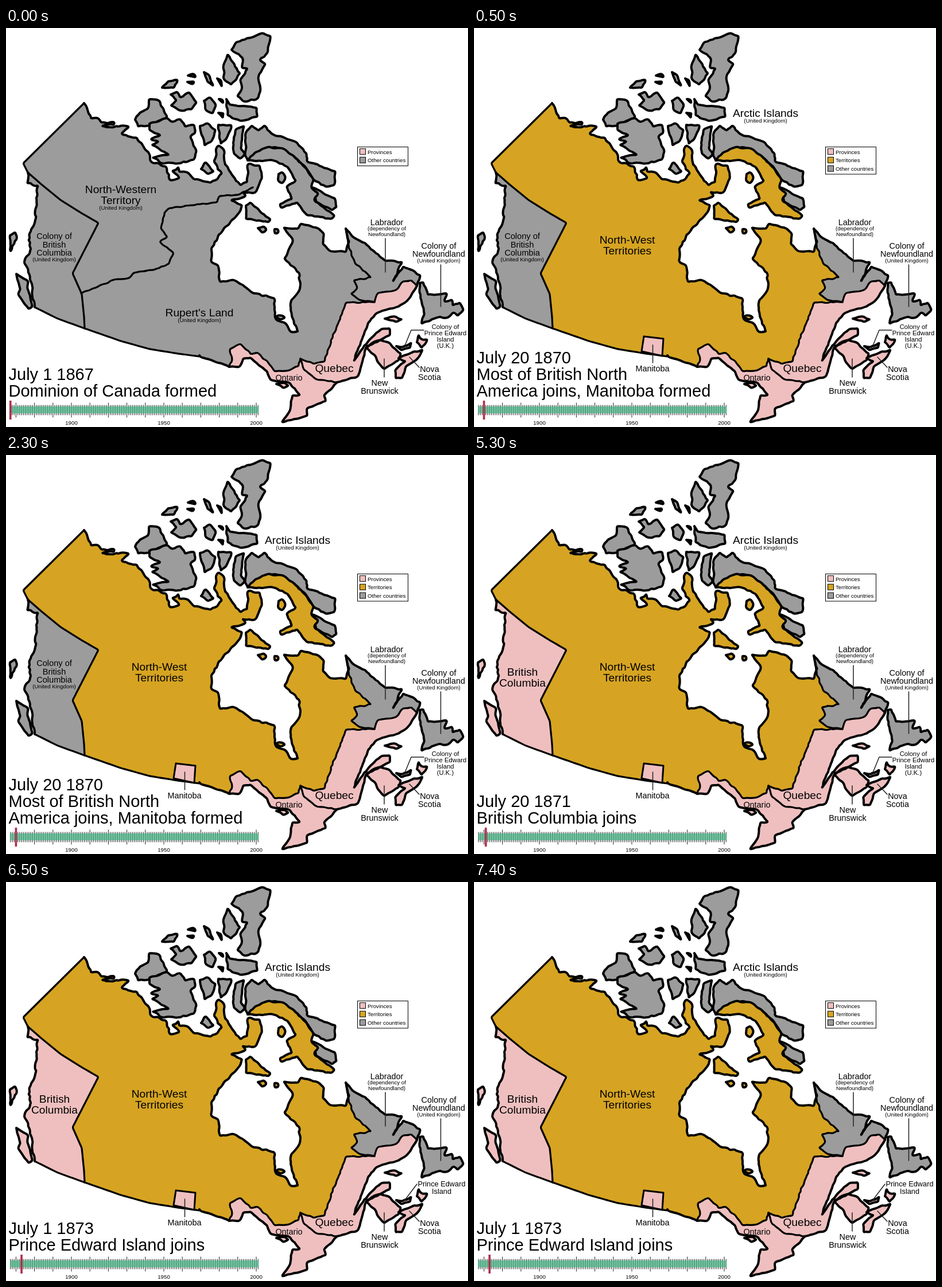
Recreate the animation shown at these times as an HTML page. Size 805 px wide and 696 px high, loop 8 s.

```html
<!DOCTYPE html>
<html lang="en">
<head>
<meta charset="utf-8">
<title>Map timeline</title>
<style>
html, body { margin: 0; width: 100%; height: 100%; overflow: hidden; background: #fff; }
svg { display: block; width: 100vw; height: 100vh; font-family: "Liberation Sans", Arial, sans-serif; }
path { stroke-linejoin: round; stroke-linecap: round; }
.line path { fill: none; stroke: #000; }
.lead path { fill: none; stroke: #222; stroke-width: 1.5; }
</style>
</head>
<body>
<svg id="map" viewBox="0 0 805 696"></svg>
<script>
const GREY = '#9c9c9c', GOLD = '#d6a422', PINK = '#efbfbf';
const STARTS = [0, 500, 3500, 6500], YEARS = [1867, 1870, 1871, 1873], LOOP = 8000;
const COAST = 4, BORDER = 3.2;
const svg = document.getElementById('map');
const steps = [];   // called with each new stage

function add(parent, tag, attrs, text) {
  const el = document.createElementNS('http://www.w3.org/2000/svg', tag);
  for (const k in attrs) el.setAttribute(k, attrs[k]);
  if (text) el.textContent = text;
  parent.appendChild(el);
  return el;
}
const group = name => add(svg, 'g', { class: name });

// show an element only in the stages named, such as '123'
function only(el, stages) {
  if (stages) steps.push(s => el.style.display = stages.includes(s) ? '' : 'none');
  return el;
}

let seed = 7;
const jitter = amp => {
  seed = (seed * 16807) % 2147483647;
  return (seed / 2147483647 * 2 - 1) * amp;
};

// cuts the lines between key points into short steps that wander a little
function rough(text, amp, closed) {
  const v = text.split(' ').map(Number), keys = [], out = [];
  for (let i = 0; i < v.length; i += 2) keys.push([v[i], v[i + 1]]);
  if (closed) keys.push(keys[0]);
  for (let i = 1; i < keys.length; i++) {
    const [x, y] = keys[i - 1], dx = keys[i][0] - x, dy = keys[i][1] - y;
    const n = Math.max(1, Math.round(Math.hypot(dx, dy) / 5));
    out.push([x, y]);
    for (let k = 1; k < n; k++) out.push([x + dx * k / n + jitter(amp), y + dy * k / n + jitter(amp)]);
  }
  out.push(keys[keys.length - 1]);
  return out;
}

// rounded line through the points; the same in both directions
function curve(pts) {
  const last = pts.length - 1;
  let d = `${pts[0]}`;
  for (let i = 1; i < last; i++) {
    const [x, y] = pts[i], [nx, ny] = pts[i + 1];
    d += `Q${x} ${y} ${i + 1 < last ? [(x + nx) / 2, (y + ny) / 2] : [nx, ny]}`;
  }
  return last > 1 ? d : `${d}L${pts[last]}`;
}

// coasts and borders: [width, roughness, key points]
const arcs = {
  yukon: [BORDER, 0, '38 252 30 236 136 131'],
  arctic: [COAST, 2, '136 131 148 158 160 157 166 165 189 164 188 169 167 171 196 172 214 172 201 184 228 191 248 216 254 234 278 241 286 266 302 262 290 249 300 242 302 251 318 253 328 264 356 270 368 264 376 254 362 233 370 205 380 212 382 238'],
  boothia: [COAST, 1.5, '382 238 392 253 408 274 420 269 422 237 442 240 446 262 434 287 412 286 418 293 392 301 411 309 409 317'],
  hudsonW: [COAST, 1.5, '409 317 398 332 380 349 359 382 357 407 370 415 373 443 398 440 432 463 467 471 470 508 487 515 496 530 508 529'],
  hudsonE: [COAST, 1.5, '508 529 498 503 496 479 512 456 511 427 485 402 500 370 484 348 509 350 514 341 545 350 554 360 552 377 564 389 592 391 598 372 592 350'],
  labW: [BORDER, 1.5, '592 350 597 384 608 410 636 435 606 440 612 454 601 463 615 474 642 478'],
  labS: [BORDER, 1, '642 478 648 462 680 457 690 443 706 440 716 450'],
  labE: [COAST, 1.5, '716 450 722 431 692 416 674 442 690 408 660 406 629 379 602 362 592 350'],
  queW: [BORDER, 1.5, '642 478 592 479 560 563 555 582 536 586 513 577'],
  ontN: [BORDER, 1.5, '513 577 510 590 489 598 468 599 456 582 438 566 426 569 408 551 390 560 394 577 389 591'],
  ontS: [COAST, 1.2, '389 591 407 591 413 577 426 575 455 599 461 614 494 619 512 640 499 641 495 667 481 688 497 684 525 676 524 664 557 651 554 641 577 618'],
  ontE: [BORDER, 1, '513 577 519 596 541 613 577 618'],
  queS: [COAST, 1, '577 618 613 608 628 556 655 543 669 536 669 524 654 525 634 543 618 563 606 581 618 548 631 514 646 497 684 486 698 477 716 450'],
  lakes: [COAST, 1, '389 591 357 579 339 574 337 571'],
  south: [BORDER, 0, '337 573 300 568 250 560 200 546 137 524'],
  bcE: [BORDER, 0, '38 252 62 273 95 300 130 322 161 340 116 428 132 464 136 504 137 524'],
  bcW: [COAST, 2, '38 252 37 271 56 275 50 340 40 360 42 388 32 408 41 430 50 487'],
  bcS: [BORDER, 0, '50 487 90 507 137 524']
};
for (const name in arcs) arcs[name].pts = rough(arcs[name][2], arcs[name][1]);
// joins arcs into a ring; '-name' runs backwards
const ring = names => names.split(' ').map((n, i) => {
  const { pts } = arcs[n.replace('-', '')];
  return (i ? 'L' : 'M') + curve(n[0] === '-' ? [...pts].reverse() : pts);
}).join('') + 'Z';

// stage at which a kind of land joins, and its colour from then on
const joins = { terr: [1, GOLD], bc: [2, PINK], pei: [3, PINK], prov: [0, PINK], isle: [9, GREY] };
const land = group('land'), lines = group('line');
function region(kind, d, attrs) {
  const [from, colour] = joins[kind], el = add(land, 'path', { d, ...attrs });
  steps.push(s => el.setAttribute('fill', s >= from ? colour : GREY));
}

region('terr', ring('yukon arctic boothia hudsonW hudsonE labW queW ontN lakes south -bcE'));
region('bc', ring('-bcE bcW bcS'));
region('isle', ring('labW labS labE'));
region('prov', ring('queW ontE queS -labS'));
region('prov', ring('ontN ontS -ontE'));
for (const name in arcs)
  add(lines, 'path', { d: 'M' + curve(arcs[name].pts), 'stroke-width': arcs[name][0] });
const oldBorder = rough('131 463 192 438 215 436 222 427 258 422 284 411 292 392 268 373 281 364 270 350 276 322 284 314 368 304 372 293 404 291 430 278', 1);
only(add(lines, 'path', { d: 'M' + curve(oldBorder), 'stroke-width': BORDER }), '0');

const islands = {
  isle: [
    '393 38 402 24 448 9 461 14 455 44 442 56 452 63 440 84 443 111 437 124 414 128 403 119 411 106 408 91 421 71 411 70 413 53',
    '379 65 386 46 408 79 392 99 380 90',
    '384 124 390 134 437 139 438 155 408 162 386 152',
    '272 104 282 93 299 90 293 104', '317 83 328 80 331 86', '316 94 328 93 326 98',
    '345 77 354 82 361 101 351 94', '368 88 375 92 376 102',
    '287 116 298 111 303 121 319 112 332 130 323 142 304 144 287 135 297 126',
    '345 127 356 121 366 134 360 149 347 142', '370 148 379 149 378 157', '371 124 377 124 379 131',
    '225 160 234 147 247 141 249 124 266 126 281 155 255 168 230 172',
    '250 167 281 157 289 164 304 159 312 172 328 169 329 184 321 190 332 215 327 230 300 236 272 236 255 226 284 221 254 204 266 198 252 194 269 187 250 178',
    '338 171 350 166 365 178 358 198 346 205', '370 169 393 170 385 191 374 202', '340 246 348 234 362 250 352 255',
    '396 200 400 177 415 171 409 210 416 221 408 228 397 219',
    '417 223 418 182 428 170 440 179 450 170 462 184 504 198 524 219 524 232 551 242 574 250 572 274 558 277 536 265 524 246 501 223 482 210 455 208 421 231',
    '533 278 573 297 576 312 568 318 540 303',
    '721 445 727 443 735 465 768 463 764 477 777 474 778 484 790 479 797 492 787 502 779 496 770 505 751 505 724 516 729 499 722 471'
  ],
  terr: [
    '421 231 433 218 455 208 482 210 501 223 524 246 536 265 532 279 544 288 537 300 572 327 567 333 524 326 507 304 479 314 477 307 498 298 489 277 505 266 490 242 462 230 436 232',
    '475 255 482 252 487 261 481 271 474 266', '439 349 449 346 454 351 446 357', '468 351 474 350 475 357 469 359',
    '418 310 426 304 445 323 461 334 457 339 433 335 418 333', '469 504 476 501 486 505 478 509'
  ],
  bc: [
    '7 362 16 356 19 364 8 390',
    '18 429 39 442 37 454 46 486 39 490 21 465 25 456'
  ],
  prov: [
    '660 507 674 503 690 508 680 513', '471 621 486 619 492 624 483 628',
    '628 558 636 551 652 544 670 551 688 568 684 580 659 595 649 584 642 570',
    '684 576 694 571 726 561 715 579 697 590 690 611 679 611 678 597 696 581',
    '716 548 719 535 724 543 734 543 724 558'
  ],
  pei: ['680 555 690 557 706 549 704 558 689 562']
};
for (const kind in islands)
  for (const keys of islands[kind])
    region(kind, `M${curve(rough(keys, 1.3, true))}Z`, { stroke: '#000', 'stroke-width': COAST });
only(add(land, 'path', { d: 'M296 538L330 542 328 572 292 564Z', fill: PINK, stroke: '#000', 'stroke-width': 3 }), '123');

// leader lines
const lead = group('lead');
for (const [d, stages] of [
  ['M661 367V426M757.5 413V486M659 577V609M720 592L703 574'],
  ['M311.5 553V584', '123'], ['M728 527H706L695 554', '012'], ['M716 527L694 556', '3']
]) only(add(lead, 'path', { d }), stages);

// lines of text split at '|', then a small note below
const words = group('words');
const BIG = 19.2, MID = 14.4, SMALL = 9.7, UK = '(United Kingdom)';
function label(x, y, size, text, stages, note, anchor = 'middle') {
  for (const row of text.split('|')) {
    only(add(words, 'text', { x, y, 'font-size': size, 'text-anchor': anchor }, row), stages);
    y += size;
  }
  if (note) label(x, y - size + 9.5, SMALL, note, stages);
}
label(200, 288, BIG, 'North-Western|Territory', '0', UK);
label(337, 503, BIG, "Rupert's Land", '0', UK);
label(267, 376, BIG, 'North-West|Territories', '123');
label(508, 155, BIG, 'Arctic Islands', '123', UK);
label(84, 368, 14.6, 'Colony of|British|Columbia', '01', UK);
label(84.5, 384.5, BIG, 'British|Columbia', '23');
label(311, 598.5, MID, 'Manitoba', '123');
label(572, 600, BIG, 'Quebec');
label(493, 615, MID, 'Ontario');
label(651, 624, MID, 'New|Brunswick');
label(738, 600, MID, 'Nova|Scotia');
label(663.5, 343.5, MID, 'Labrador', '', '(dependency of|Newfoundland)');
label(754, 385, MID, 'Colony of|Newfoundland', '', UK);
label(765.5, 524.5, 11.3, 'Colony of|Prince Edward|Island|(U.K.)', '012');
label(759, 531, 12.8, 'Prince Edward|Island', '3');
[
  'July 1 1867|Dominion of Canada formed',
  'July 20 1870|Most of British North|America joins, Manitoba formed',
  'July 20 1871|British Columbia joins',
  'July 1 1873|Prince Edward Island joins'
].forEach((text, s) =>
  label(4.5, 643 - 29 * (text.split('|').length - 1), 29, text, String(s), '', 'start'));

// legend
function legend(stages, rows) {
  const g = only(group('legend'), stages);
  add(g, 'rect', { x: 612.5, y: 207.5, width: 88, height: 4 + rows.length * 14.5, fill: '#fff', stroke: '#000' });
  rows.forEach(([colour, name], i) => {
    const y = 210.5 + i * 14.8;
    add(g, 'rect', { x: 616.5, y, width: 10, height: 10, fill: colour, stroke: '#000' });
    add(g, 'text', { x: 630, y: y + 9, 'font-size': SMALL }, name);
  });
}
const provinces = [PINK, 'Provinces'], others = [GREY, 'Other countries'];
legend('0', [provinces, others]);
legend('123', [provinces, [GOLD, 'Territories'], others]);

// year scale
const scale = group('scale');
const yearX = y => 114 + (y - 1900) * 3.22;
let ticks = '';
for (let y = 1867; y <= 2001; y++) ticks += `M${yearX(y)} ${y % 10 ? '658V675' : '654V679'}`;
add(scale, 'path', { d: ticks, stroke: '#000', 'stroke-width': 0.9, 'stroke-linecap': 'butt' });
add(scale, 'rect', { x: 7, y: 660, width: 433, height: 12, fill: '#2fb57c', opacity: 0.6 });
for (const y of [1900, 1950, 2000])
  add(scale, 'text', { x: yearX(y), y: 692, 'font-size': SMALL, 'text-anchor': 'middle' }, y);
const marker = add(scale, 'rect', { y: 650, width: 3.6, height: 33, fill: '#b02d4a' });
steps.push(s => marker.setAttribute('x', yearX(YEARS[s]) - 1.8));

let shown = -1;
function frame() {
  const t = performance.now() % LOOP;
  const stage = STARTS.filter(v => v <= t).length - 1;
  if (stage !== shown) steps.forEach(f => f(shown = stage));
  requestAnimationFrame(frame);
}
frame();
</script>
</body>
</html>
```
